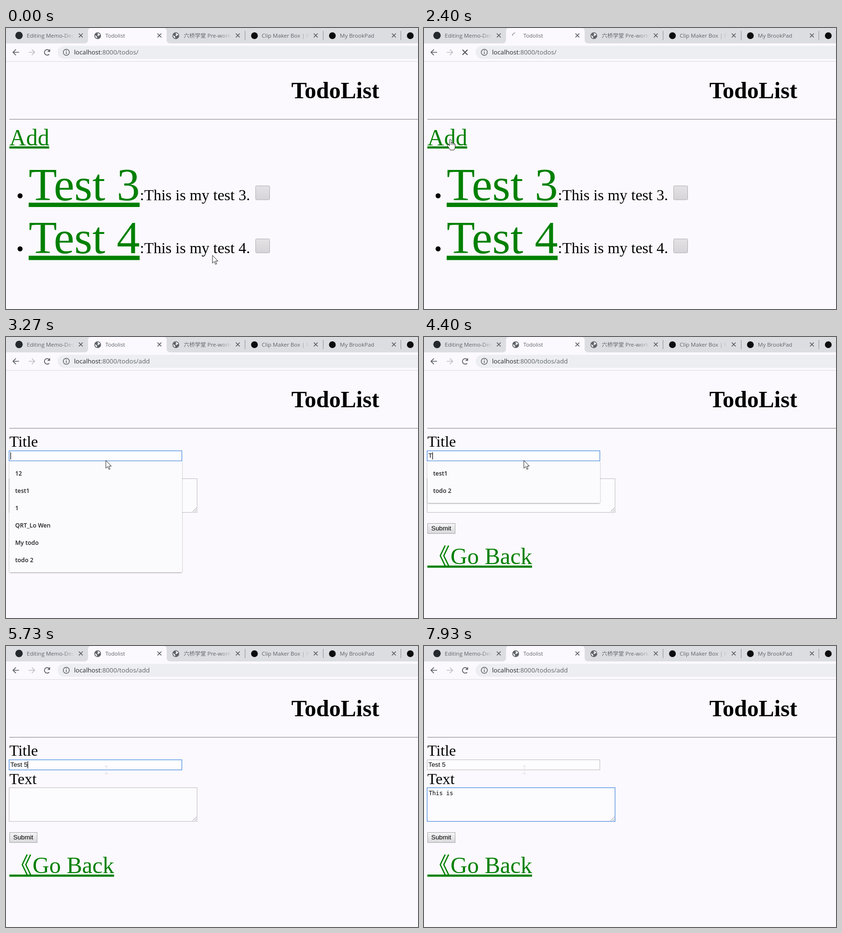
An HTML page that plays this animation: 854x584 px, repeating every 8 s.

```html
<!DOCTYPE html>
<html lang="en">
<head>
<meta charset="utf-8">
<title>Todo page</title>
<style>
html, body { margin: 0; width: 100%; height: 100%; overflow: hidden; background: #fbf9fd; }
svg { display: block; width: 854px; height: 584px; }
text { white-space: pre; font-kerning: normal; }
.ui { font-family: "Open Sans", "Noto Sans", sans-serif; }
.tab { font-size: 11.5px; }
.url { font-size: 13.2px; fill: #5f6368; }
.serif { font-family: "Liberation Serif", "Times New Roman", serif; }
.sans { font-family: "Liberation Sans", Arial, sans-serif; font-size: 13.33px; }
.mono { font-family: "DejaVu Sans Mono", monospace; font-size: 12px; }
.item { font-size: 12.3px; font-weight: 600; fill: #202124; }
.green { fill: #008000; }
.cjk { font-family: "Noto Sans CJK SC", "Noto Sans CJK", sans-serif; font-weight: 300; }
.line { fill: none; stroke: #5a5d61; stroke-width: 1.7; }
.cur { fill: #fff; stroke: #222; stroke-width: 1; stroke-linejoin: round; }
</style>
</head>
<body>
<svg id="stage" viewBox="0 0 854 584" xmlns="http://www.w3.org/2000/svg">
  <defs>
    <linearGradient id="grey" x2="0" y2="1">
      <stop offset="0" stop-color="#e4e2e5"/><stop offset="1" stop-color="#d6d4d8"/>
    </linearGradient>
    <linearGradient id="btn" x2="0" y2="1">
      <stop offset="0" stop-color="#f5f4f6"/><stop offset="1" stop-color="#d9d8db"/>
    </linearGradient>
    <filter id="shade" x="-5%" y="-5%" width="110%" height="115%">
      <feDropShadow dx="0" dy="1" stdDeviation="1.3" flood-color="#000" flood-opacity=".4"/>
    </filter>
    <g id="globe">
      <circle r="7" fill="#5f6368"/>
      <path d="M-5.4-1.2L-1.6 1.6L-1 5.4C-4 4.8-5.6 2-5.4-1.2ZM-.8-5.2C2-5.8 4.6-4 5.3-1.4L2.4-.6L1.6 1.2L-1-.8L1-2.4Z" fill="#f1f1f4"/>
    </g>
    <path id="cross" d="M-4-4L4 4M4-4L-4 4" class="line"/>
  </defs>

  <rect width="854" height="584" fill="#fbf9fd"/>
  <rect width="854" height="32" fill="#dcdde1"/>
  <path d="M162 32Q170 32 170 25V6Q170 0 177 0H326Q333 0 333 6V25Q333 32 341 32Z" fill="#fbf9fd"/>
  <g id="tabs"></g>
  <use id="favicon" href="#globe" x="190" y="16"/>
  <path id="spinner" d="M-6 0A6 6 0 0 1 -.5 -6" fill="none" stroke="#8f9195" stroke-width="1.7"/>

  <path d="M27 50.5H15M20.5 44.5L14.5 50.5L20.5 56.5" class="line"/>
  <path d="M47 50.5H59M53.5 44.5L59.5 50.5L53.5 56.5" class="line" style="stroke:#bfc0c4"/>
  <g id="reload">
    <path d="M89.6 54.6A5.8 5.8 0 1 1 89.2 46.2" class="line"/>
    <path d="M91.4 43.6V49.4H85.6Z" fill="#5a5d61"/>
  </g>
  <use id="stop" href="#cross" transform="translate(85 50.5) scale(1.3)"/>
  <rect x="107" y="37" width="780" height="27" rx="13.5" fill="#edeef1"/>
  <circle cx="125" cy="50.5" r="6.3" class="line" style="stroke-width:1.4"/>
  <path d="M125 49.6V54M125 46.6V48.1" class="line" style="stroke-width:1.5"/>
  <text class="ui url" x="141" y="55.3"><tspan fill="#26282b">localhost</tspan><tspan id="path"></tspan></text>
  <rect y="69" width="854" height="1" fill="#dadade"/>

  <text class="serif" x="591.5" y="146" font-size="48" font-weight="700">TodoList</text>
  <rect x="7" y="189" width="847" height="1" fill="#98979b"/>
  <rect x="7" y="190" width="847" height="1" fill="#dddbe0"/>

  <g id="list" class="serif">
    <text class="green" x="7" y="244" font-size="48">Add</text>
    <rect class="green" x="7" y="246" width="82.5" height="4.5"/>
  </g>

  <g id="form">
    <g class="serif" font-size="32">
      <text x="7" y="228">Title</text>
      <text x="7" y="286.5">Text</text>
    </g>
    <rect id="titleBox" x="6.5" y="236.5" width="358" height="21" fill="#fdfcfe"/>
    <rect id="bodyBox" x="6.5" y="294.5" width="389.5" height="70" fill="#fcfbfe"/>
    <path d="M387 363L395 355M391.5 363L395 359.5" stroke="#8c8b90" fill="none"/>
    <text id="titleText" class="sans" x="9" y="251"></text>
    <text id="bodyText" class="mono" x="10" y="310"></text>
    <rect x="7.5" y="387.5" width="57" height="21" fill="url(#btn)" stroke="#a9a8ac"/>
    <text class="sans" x="15" y="402">Submit</text>
    <text class="cjk green" x="8" y="471" font-size="46">《</text>
    <text class="serif green" x="55" y="472" font-size="48">Go Back</text>
    <rect class="green" x="7" y="475" width="217" height="4.5"/>
    <g id="popup">
      <rect id="panel" x="7" y="258" width="358" rx="3" fill="#fbfafd" filter="url(#shade)"/>
      <g id="items" class="ui item"></g>
    </g>
    <rect id="caret" width="1.2" height="15"/>
  </g>

  <g id="mouse">
    <path id="arrow" class="cur" d="M.5.5V16.8L4.3 13.2L6.8 19.2L9.2 18.2L6.8 12.3H11.8Z"/>
    <g id="hand" class="cur" transform="translate(-6.7 -.5)">
      <path d="M5 13.5V2a1.7 1.7 0 0 1 3.4 0V8c.6-1 3-.9 3.2.6.8-.8 2.7-.4 2.8 1 .9-.6 2.4 0 2.4 1.4V16c0 3-1.8 4-2.3 6.6H6.5C6 19.5 2.6 17.5.6 13.2c-.6-1.5 1.3-2.5 2.4-1.4z"/>
      <path d="M8.4 8V12M11.6 8.6V12M14.4 9.6V12.4" fill="none"/>
    </g>
    <path id="beam" d="M-3.5-7.5H-1L0-6.5L1-7.5H3.5M0-6.5V7.5M-3.5 8.5H-1L0 7.5L1 8.5H3.5" fill="none" stroke="#e3e2e8" stroke-width="1.3"/>
  </g>
</svg>
<script>
const $ = id => document.getElementById(id);

function add(parent, tag, attrs, text) {
  const el = document.createElementNS("http://www.w3.org/2000/svg", tag);
  for (const k in attrs) el.setAttribute(k, attrs[k]);
  if (text) el.textContent = text;
  return parent.appendChild(el);
}
const set = (id, attrs) => { for (const k in attrs) $(id).setAttribute(k, attrs[k]); };
const show = (id, on) => { $(id).style.display = on ? "" : "none"; };

// Tab titles fade out before the close button.
function tab(x, label, size) {
  const end = x + 99, id = "fade" + x;
  const g = add($("stage").querySelector("defs"), "linearGradient",
    { id, gradientUnits: "userSpaceOnUse", x1: end - 24, x2: end, y1: 0, y2: 0 });
  add(g, "stop", { offset: 0, "stop-color": "#5f6368" });
  add(g, "stop", { offset: 1, "stop-color": "#5f6368", "stop-opacity": 0 });
  add($("tabs"), "text", { x, y: 19.5, class: "ui tab", fill: `url(#${id})`, style: `font-size:${size || 11.5}px` }, label);
  add($("tabs"), "use", { href: "#cross", x: x + 112, y: 15.5 });
}
tab(43, "Editing Memo-Desk/Form");
tab(206, "Todolist", 11.2);
tab(368.5, "六桥学堂 Pre-work");
tab(530, "Clip Maker Box | Flow");
tab(692, "My BrookPad");
add($("tabs"), "circle", { cx: 27, cy: 15.5, r: 7.7, fill: "#24292e" });
add($("tabs"), "use", { href: "#globe", x: 352, y: 16 });
for (const x of [515, 676.5, 838]) add($("tabs"), "circle", { cx: x, cy: 16, r: 7, fill: "#0c0c0e" });
for (const x of [495, 657, 818]) add($("tabs"), "rect", { x, y: 6, width: 1, height: 19, fill: "#8c8f94" });

function todo(y, n) {
  const g = $("list");
  add(g, "circle", { cx: 29.2, cy: y - 9.3, r: 5.2 });
  add(g, "text", { x: 47, y, class: "green", "font-size": 96 }, "Test " + n);
  add(g, "rect", { x: 47, y: y + 5, width: 230, height: 9, class: "green" });
  add(g, "text", { x: 277.5, y, "font-size": 32 }, `:This is my test ${n}.`);
  add(g, "rect", { x: 517.5, y: y - 30, width: 29, height: 29, rx: 2, fill: "url(#grey)", stroke: "#b0aeb3" });
}
todo(358, 3);
todo(468.3, 4);

const LOOP = 8000, LOAD = 2130, OPEN = 2670, FOCUS = 3200, NEXT = 6130;
const TITLE = "Test 5", titleKeys = [3930, 4530, 5130, 5470, 5570, 5670];
const BODY = "This is ", bodyKeys = [6470, 6600, 6730, 6870, 6930, 7000, 7070, 7400];
const HINTS = ["12", "test1", "1", "QRT_Lo Wen", "My todo", "todo 2"];
const popups = [[FOCUS, 3930, HINTS], [4060, 4530, ["test1", "todo 2"]], [4660, 5130, ["test1"]], [5200, 5470, ["test1"]]];

// start, end, target x, target y
const moves = [[70, 1130, 40.5, 225], [1200, 1400, 50.5, 231.5], [1870, 1930, 54.5, 231.5], [2470, 3000, 206.5, 256]];

function pointer(t) {
  let x = 427.5, y = 472;
  for (const [a, b, tx, ty] of moves) {
    const p = Math.min(1, Math.max(0, (t - a) / (b - a)));
    const e = (1 - Math.cos(Math.PI * p)) / 2;
    x += (tx - x) * e;
    y += (ty - y) * e;
  }
  return [x, y];
}

let shown = null;
function drawPopup(list) {
  show("popup", list);
  if (!list || list === shown) return;
  shown = list;
  set("panel", { height: 15 + 36 * list.length });
  $("items").textContent = "";
  list.forEach((s, i) => add($("items"), "text", { x: 19, y: 288.4 + 36 * i }, s));
}

function draw(t) {
  const form = t >= OPEN, loading = t >= LOAD && t < OPEN;
  show("list", !form);
  show("form", form);
  show("favicon", !loading);
  show("spinner", loading);
  show("reload", !loading);
  show("stop", loading);
  set("spinner", { transform: `translate(189.5 16) rotate(${(2400 - t) * 0.225})` });
  $("path").textContent = ":8000/todos/" + (form ? "add" : "");

  const onTitle = t >= FOCUS && t < NEXT, onBody = t >= NEXT;
  const edge = on => ({ stroke: on ? "#4f8fe0" : "#bebcc2", "stroke-width": on ? 1.3 : 1 });
  set("titleBox", edge(onTitle));
  set("bodyBox", edge(onBody));

  const typed = (s, keys) => s.slice(0, keys.filter(k => k <= t).length);
  $("titleText").textContent = typed(TITLE, titleKeys);
  const body = $("bodyText").textContent = typed(BODY, bodyKeys);

  const last = Math.max(...[FOCUS, NEXT, ...titleKeys, ...bodyKeys].filter(k => k <= t));
  show("caret", (onTitle || onBody) && Math.floor((t - last) / 530) % 2 === 0);
  if (onBody) set("caret", { x: 10 + body.length * 7.224, y: 299 });
  else set("caret", { x: 9 + (form ? $("titleText").getComputedTextLength() : 0), y: 239.5 });

  const pop = popups.find(([a, b]) => t >= a && t < b);
  drawPopup(pop ? pop[2] : null);

  const [x, y] = pointer(t);
  const hand = !form && x < 90 && y > 204 && y < 252;
  const beam = (t >= 3000 && t < FOCUS) || t >= 5470;
  show("hand", hand);
  show("beam", beam);
  show("arrow", !hand && !beam);
  set("mouse", { transform: `translate(${x + (beam ? 1.5 : 0)} ${y + (beam ? 1 : 0)})` });
}

const start = performance.now();
function tick(now) {
  draw(Math.max(0, now - start) % LOOP);
  requestAnimationFrame(tick);
}
draw(0);
requestAnimationFrame(tick);
</script>
</body>
</html>
```
